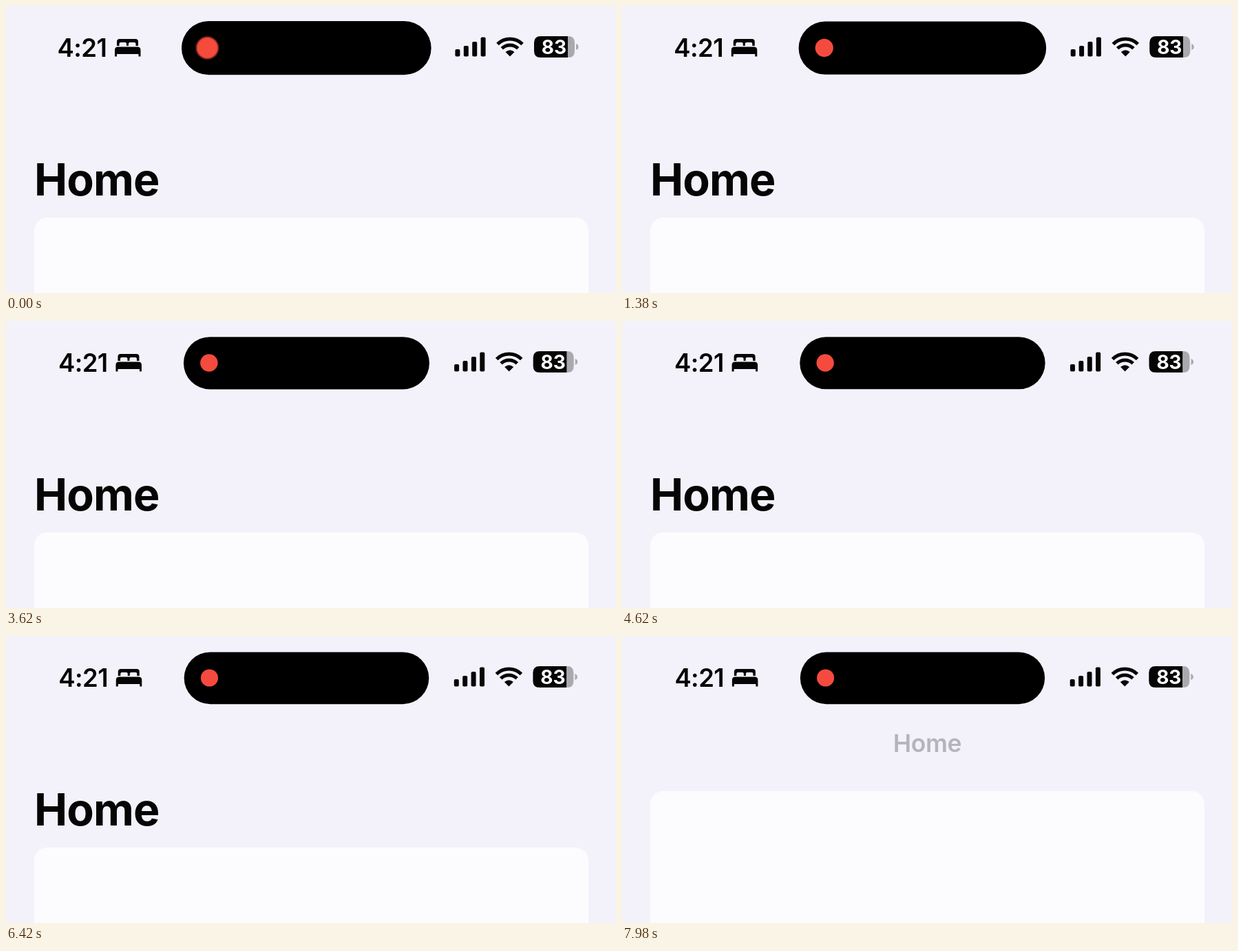
An HTML page that plays this animation: 886 by 418 pixels, repeating every 8000 ms.

```html
<!DOCTYPE html>
<html lang="en">
<head>
<meta charset="utf-8">
<title>Home</title>
<style>
  html, body { margin: 0; width: 100%; height: 100%; overflow: hidden; background: #f3f2fb; }
  svg { display: block; width: 100vw; height: 100vh; }
  text { font-family: Inter, "Liberation Sans", sans-serif; }
</style>
</head>
<body>
<svg viewBox="0 0 886 418">
  <defs>
    <clipPath id="page"><rect y="201" width="886" height="217"/></clipPath>
    <filter id="blur" x="-50%" y="-50%" width="200%" height="200%"><feGaussianBlur id="soft" stdDeviation="1"/></filter>
  </defs>
  <rect width="886" height="418" fill="#f3f2fb"/>

  <g clip-path="url(#page)">
    <g id="content">
      <text x="41" y="275.5" font-size="64.5" font-weight="700" letter-spacing="-.9" fill="#050505">Home</text>
      <rect x="41" y="308" width="805" height="400" rx="19" fill="#fcfcff"/>
    </g>
  </g>
  <text id="title" x="443.5" y="169" font-size="35.5" font-weight="600" text-anchor="middle" letter-spacing="-.4">Home</text>

  <g id="left" fill="#050505">
    <text x="74.5" y="73.5" font-size="36.500" font-weight="600" letter-spacing="-.6">4:21</text>
    <g transform="translate(-1 0)">
      <path d="M162 58V52q0-4 4-4H189q4 0 4 4V58H189.500V55q0-2-2-2H181q-2 0-2 2V58H176V55q0-2-2-2H167.500q-2 0-2 2V58Z"/>
      <path d="M159 73.500V64q0-4.500 4.500-4.500H192q4.500 0 4.500 4.500V73.500H193.500V70H162V73.500Z"/>
    </g>
  </g>

  <rect id="island"/>
  <circle id="dot" cy="61" fill="#f54b3e"/>

  <g id="right" fill="#050505">
    <g id="bars"></g>
    <g id="wifi" fill="none" stroke="#050505" stroke-width="5"></g>
    <path d="M732 73.500L725.500 67Q732 61.500 738.500 67Z"/>
    <path d="M776.500 44H816V75H776.500Q767 75 767 65.500V53.500Q767 44 776.500 44Z"/>
    <path d="M816 44H817Q826 44 826 53.500V65.500Q826 75 817 75H816Z" fill="#aaaaae"/>
    <path d="M828 55Q831.500 56 831.500 59.500T828 64Z" fill="#aaaaae"/>
    <text x="796" y="70" font-size="28" font-weight="700" text-anchor="middle" fill="#fff">83</text>
  </g>
</svg>
<script>
const LOOP = 8000;
const $ = id => document.getElementById(id);
const set = (el, attrs) => { for (const k in attrs) el.setAttribute(k, attrs[k]); };
const add = (parent, tag, attrs) => {
  const el = document.createElementNS('http://www.w3.org/2000/svg', tag);
  set(el, attrs);
  parent.append(el);
};

[10.5, 15.5, 21.5, 28].forEach((h, i) => add($('bars'), 'rect', {
  x: 652.4 + i * 12.4, y: 73.5 - h, width: 7, height: h, rx: 1.8
}));

// Wi-Fi arcs share a centre at the foot of the fan
for (const r of [16.5, 25.5]) {
  const d = r * Math.SQRT1_2;
  add($('wifi'), 'path', { d: `M${732 - d} ${73.5 - d}A${r} ${r} 0 0 1 ${732 + d} ${73.5 - d}` });
}

const lerp = (a, b, k) => a + (b - a) * k;

// Finger drag: [ms, distance]
const drag = [[0, 0], [6480, 0], [6720, 17], [6960, 36], [7580, 54], [7980, 82], [8000, 83]];

function track(keys, t) {
  const i = keys.findIndex(k => k[0] > t);
  const [t0, a] = keys[i - 1], [t1, b] = keys[i];
  return lerp(a, b, (t - t0) / (t1 - t0));
}

function draw(t) {
  const k = 1 - Math.exp(-t / 2800);
  const settle = Math.exp(-t / 400);
  const x = lerp(255, 259.1, k), y = lerp(22, 23.6, k);
  const h = lerp(78.3, 75.5, k);
  set($('island'), { x, y, width: lerp(617.6, 613.9, k) - x, height: h, rx: h / 2 });

  set($('dot'), { cx: lerp(292.4, 295.8, k), r: lerp(13.4, 12.5, k) + 2.6 * settle });
  if (settle > .1) {
    set($('soft'), { stdDeviation: 1.2 * settle });
    $('dot').setAttribute('filter', 'url(#blur)');
  } else $('dot').removeAttribute('filter');

  set($('left'), { transform: `translate(${2 * k} 0)` });
  set($('right'), { transform: `translate(${-1.8 * k} 0)` });

  const scroll = track(drag, t);
  set($('content'), { transform: `translate(0 ${-scroll})` });
  set($('title'), { opacity: Math.max(0, (scroll - 74) / 32) });
}

function tick(now) {
  draw(now % LOOP);
  requestAnimationFrame(tick);
}
draw(0);
requestAnimationFrame(tick);
</script>
</body>
</html>
```
